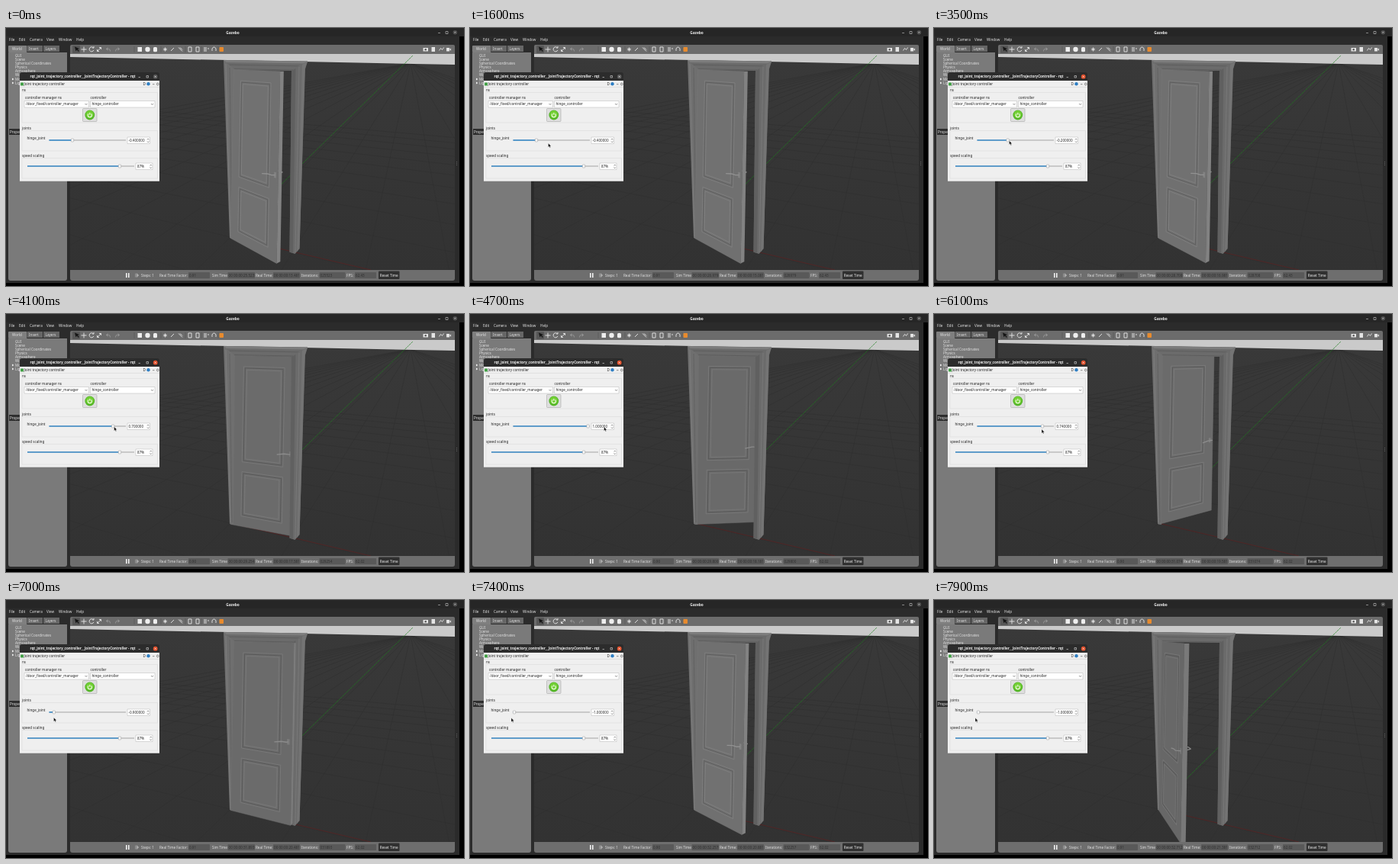
Recreate the animation shown at these times as an HTML page. Size 600 px wide and 338 px high, loop 8 s.

```html
<!DOCTYPE html>
<html lang="en">
<head>
<meta charset="utf-8">
<title>Door joint control</title>
<style>
html, body { margin: 0; width: 100%; height: 100%; overflow: hidden; background: #000; }
svg { display: block; width: 100vw; height: 100vh; }
text { font: 4.6px "Noto Sans", sans-serif; white-space: pre; }
.bold { font-weight: 700; }
.light { fill: #e2e2e2; }
.dim { fill: #303030; }
.qt { fill: #242424; }
.box { fill: #fff; stroke: #b4b4b4; stroke-width: .5; }
.group { fill: none; stroke: #d6d6d6; stroke-width: .5; }
</style>
</head>
<body>
<svg viewBox="0 0 600 338" xmlns="http://www.w3.org/2000/svg">
  <defs>
    <clipPath id="view"><rect x="84" y="34" width="504" height="283"/></clipPath>
    <linearGradient id="floor" x2="0" y2="1"><stop stop-color="#393939"/><stop offset="1" stop-color="#323232"/></linearGradient>
  </defs>

  <rect width="594" height="334" fill="#2b2b2b"/>
  <rect width="600" height="11" fill="#262626"/>
  <text x="297" y="7.800" text-anchor="middle" class="bold" fill="#eee" style="font-size:4.8px">Gazebo</text>
  <circle cx="588.300" cy="5.700" r="2.800" fill="#4c4c4c"/>
  <path d="M566 6.500h3M576 4.500h3v3h-3zM587.300 4.700l2 2m0-2l-2 2" fill="none" stroke="#ccc" stroke-width=".6"/>
  <g id="menu" class="light"></g>

  <path d="M3 32h77v296q0 3-3 3H6q-3 0-3-3z" fill="#7a7a7a"/>
  <rect x="3" y="23" width="24.500" height="9" rx="1" fill="#7f7f7f"/>
  <path d="M28 23h20v8H28zM49 23h21v8H49z" fill="#666"/>
  <rect x="4" y="132" width="75" height="8" fill="#2e2e2e"/>
  <g id="tree" class="light"></g>
  <path d="M8 65.500l2.500 1.500-2.500 1.500zM8 70.500l2.500 1.500-2.500 1.500z" fill="#eee"/>
  <path d="M82 175v5M590.500 175v5" stroke="#777" stroke-width=".7" stroke-dasharray="1 1"/>

  <rect x="84" y="22" width="504" height="14" rx="2" fill="#6c6c6c"/>
  <rect x="87" y="23" width="10" height="10" rx="1" fill="#575757"/>
  <path d="M90 24.500l1.500 6 1.400-2 1.900 2.400 1-.9-1.900-2.300 2.200-.6z" fill="#151515"/>
  <g fill="none" stroke="#e8e8e8" stroke-width=".9">
    <path d="M98.500 28h7M102 24.500v7M114.500 26a3 3 0 1 0 .4 3M113 26h2v-2M119.500 30.500l5-5M122 25.500h2.500V28M119.500 28v2.500h2.500"/>
    <path d="M131.500 27.500l2-2m-2 2l2 2m-2-2h3q2 0 2 3M148.500 27.500l-2-2m2 2l-2 2m2-2h-3q-2 0-2 3" stroke="#999"/>
    <path d="M206 28h5M208.500 25.500v5M207 26.500l3 3m0-3l-3 3M216 30l4-4M226 25.500l5 5m-3-5l3 3M239 25h4v6h-4zM249 25h4v6h-4z" />
    <path d="M260 25v6m2-6v6m2-4h2M270 30v-3q2.500-4 5 0v3M567.500 29.500l2-3 2 2 2-3"/>
  </g>
  <path d="M168 24v8M203 24v8M235 24v8M256 24v8M278 24v8" stroke="#555" stroke-width=".6"/>
  <path d="M172.500 25h5.500v6h-5.500z" fill="#eee"/>
  <circle cx="185.500" cy="28" r="3.200" fill="#eee"/>
  <rect x="193" y="25" width="5" height="6.200" rx="1.500" fill="#eee"/>
  <rect x="279.500" y="25" width="5.500" height="6" rx="1" fill="#e88b2e"/>
  <path d="M546.500 26h6.500v4.500h-6.500zM557.500 25h4.500v6h-4.500zM577 26h4v4.500h-4zM581 28l2-1.500v3.500z" fill="#e4e4e4"/>
  <circle cx="549.700" cy="28.200" r="1.200" fill="#555"/>

  <g clip-path="url(#view)">
    <rect x="84" y="34" width="504" height="284" fill="url(#floor)"/>
    <path id="grid" fill="none" stroke="#2f2f2f" stroke-width=".6"/>
    <path d="M84 34h504v14L84 38z" fill="#cacaca"/>
    <path d="M294 274L478 317" stroke="#5e2020" stroke-width=".7"/>
    <path d="M294 270L533 36" stroke="#1d801d" stroke-width=".7" stroke-dasharray="3 .6"/>
    <g id="behind"></g>
    <g stroke-linejoin="round">
      <path d="M285 42L395 43.500 391 53 374 56 299 55z" fill="#6b6b6b"/>
      <path d="M285 42L395 43.500 394 46.500 286 45z" fill="#7d7d7d"/>
      <path d="M287 48L391 50M297 53.500L376 55" stroke="#585858" stroke-width=".7"/>
      <path d="M285 42L300 54.500 298 276 293 275z" fill="#6f6f6f"/>
      <path d="M288 47L294 273" stroke="#808080" stroke-width=".8"/>
      <path d="M293 52L296 273" stroke="#5c5c5c" stroke-width=".7"/>
      <path d="M374 56L384 49 395 44 392 54 384.500 289 378.500 296 371.500 293.500z" fill="#6b6b6b"/>
      <path d="M374 56L379.500 53 376 295 371.500 293.500z" fill="#606060"/>
      <path d="M388 48L394.500 44.500 391.500 54 384.500 289 381 293z" fill="#747474"/>
      <path d="M384 51L379 294" stroke="#7c7c7c" stroke-width=".8"/>
    </g>
    <g id="front"></g>
  </g>

  <path d="M84 317h504v11q0 3-3 3H87q-3 0-3-3z" fill="#6e6e6e"/>
  <path d="M157.800 321v6M160.800 321v6" stroke="#fff" stroke-width="1.400"/>
  <path d="M169.500 321.500v5M171 321.500l3 2.500-3 2.500z" stroke="#aaa" fill="#aaa" stroke-width=".6"/>
  <g id="status"></g>
  <rect x="488" y="318.500" width="27.500" height="10.500" rx="1" fill="#303030"/>
  <text x="501.700" y="325.700" text-anchor="middle" fill="#eee">Reset Time</text>

  <path d="M18 70V61q0-3 3-3h177q3 0 3 3v9z" fill="#2c2c2c"/>
  <rect x="18" y="69" width="183" height="131.700" fill="#efefef"/>
  <text x="100.500" y="65.400" text-anchor="middle" class="bold" fill="#f4f4f4" style="font-size:4.5px">rqt_joint_trajectory_controller__JointTrajectoryController - rqt</text>
  <path d="M173.500 64.500h2.500M184 62.500h2.500v2.500H184z" fill="none" stroke="#ddd" stroke-width=".6"/>
  <circle id="close" cx="195.700" cy="63.700" r="2.900"/>
  <path d="M194.700 62.700l2 2m0-2l-2 2" stroke="#fff" stroke-width=".6"/>
  <path d="M18 77.500h183" stroke="#d0d0d0" stroke-width=".5"/>
  <rect x="19" y="71.500" width="4" height="4" rx=".5" fill="#43a047"/>
  <circle cx="186.500" cy="73.300" r="2.200" fill="#2f7fc4"/>
  <circle cx="198.800" cy="73.500" r="1.400" fill="none" stroke="#444" stroke-width=".6"/>
  <path d="M192 73.700h2.500" stroke="#444" stroke-width=".6"/>
  <path class="group" d="M21 84.500h177.500v39.500H21zM21 134.500h177.500V161H21zM21 170.500h177.500V197H21z"/>
  <path class="box" d="M24 95.500h84.500v8.500H24zM110.500 95.500H195v8.500h-84.500zM159 143h29.500v8.500H159zM170 177h22v8.500h-22z"/>
  <path d="M103.500 99l1.500 1.500 1.500-1.500M190 99l1.500 1.500 1.500-1.500M185 146.300l1.200-1.300 1.200 1.300M185 148.500l1.200 1.300 1.200-1.300M188.500 180.300l1.200-1.300 1.200 1.300M188.500 182.500l1.200 1.300 1.200-1.300" fill="none" stroke="#444" stroke-width=".6"/>
  <rect x="100.500" y="105.500" width="18.500" height="17" rx="1" fill="#dedede" stroke="#aaa" stroke-width=".6"/>
  <circle cx="109.800" cy="114" r="6.400" fill="#55b52a"/>
  <circle cx="109.800" cy="113.300" r="5" fill="#74d035"/>
  <path d="M108 112.300a2.600 2.600 0 1 0 3.600 0M109.800 111v2.800" fill="none" stroke="#f2fbea" stroke-width="1.100"/>
  <g id="labels" class="qt"></g>
  <g id="sliders"></g>
  <text id="value" class="qt" x="160.500" y="148.900"></text>
  <path id="cursor" d="M0 0v5.200l1.300-1.100.8 1.900.9-.4-.8-1.800h1.600z" fill="#080808" stroke="#fff" stroke-width=".35"/>
</svg>
<script>
const $ = id => document.getElementById(id);
const text = (x, y, s, cls = "") => `<text x="${x}" y="${y}" class="${cls}">${s}</text>`;
const path = (pts, fill, stroke = "none", w = .7, close = "z") =>
  `<path d="M${pts.map(p => p.map(n => n.toFixed(2))).join("L")}${close}" fill="${fill}" stroke="${stroke}" stroke-width="${w}" stroke-linejoin="round"/>`;
const gray = n => `rgb(${n},${n},${n})`;

// Linear interpolation through [position, value] keys
function along(keys, t) {
  const i = keys.findIndex(k => k[0] > t);
  if (i === 0) return keys[0][1];
  if (i < 0) return keys[keys.length - 1][1];
  const [a, p] = keys[i - 1], [b, q] = keys[i];
  return p + (q - p) * (t - a) / (b - a);
}

const cursorX = [[700, 4], [1100, 52], [1600, 102.500], [2100, 88], [3100, 88], [3500, 98.500], [4300, 156],
  [4700, 175.500], [5500, 175], [5700, 170], [6100, 141], [6600, 93], [7000, 62.500], [7400, 54]];
const cursorY = [[700, 322], [1100, 230], [1600, 151], [2100, 148.500], [3100, 147.500], [4700, 148],
  [5500, 149], [6100, 151], [7000, 154], [7400, 154.500]];
const target = [[3100, -.4], [3500, -.2], [4300, 1], [5850, 1], [6100, .74], [6600, -.28], [7000, -.9], [7300, -1]];
const joint = [[3350, -.4], [3500, -.38], [3800, -.18], [4700, .53], [5250, .95], [5400, 1], [6100, 1],
  [6300, .84], [7000, -.05], [7900, -.78], [8000, -.86]];
const shade = [[-70, 102], [-47, 112], [-27, 106], [6, 105], [33, 107]];
const FOCUS = 2700;

const WIDTH = 85, THICK = 6, FOCAL = 510;

// u: across the leaf, v: down the leaf, n: out of its front face
function project(angle, u, v, n = 0) {
  const s = Math.sin(angle), c = Math.cos(angle);
  const z = 1 + (u * WIDTH * s - n * c) / FOCAL;
  const x = (-39.500 + u * WIDTH * c + n * s) / z;
  const y = 44 + (11 + 221 * v) / z;
  return [336 + x - .018 * (y - 165), y + .012 * x];
}

function door(q) {
  const angle = q - 24 * Math.PI / 180;
  const at = (u, v, n) => project(angle, u, v, n);
  const rect = (u, v, U, V, n) => [at(u, v, n), at(U, v, n), at(U, V, n), at(u, V, n)];
  const tone = Math.round(along(shade, angle * 180 / Math.PI));
  const lever = (n, m) => path([at(.94, .545, n), at(.94, .54, m), at(.86, .54, m), at(.75, .548, m)],
    "none", gray(tone + 34), 1.300, "");
  const panel = (v, V) => [0, .025, .055].map((d, i) =>
    path(rect(.17 + d, v + d * .35, .825 - d, V - d * .35), gray(tone + [-3, 3, 1][i]), gray(tone + [18, -18, 16][i]), .8)).join("");
  let out = lever(-THICK, -THICK - 6);
  if (angle < -.2) {
    out += path([at(1, 0), at(1, 0, -THICK), at(1, 1, -THICK), at(1, 1)], gray(tone + 18));
  }
  out += path(rect(0, 0, 1, 1), gray(tone), gray(tone + 8), .5);
  out += panel(.063, .622) + panel(.68, .94);
  out += path(rect(.92, .53, .96, .56), gray(tone + 18));
  return out + lever(0, 6);
}

function drawGrid() {
  const origin = [294, 274], far = [530, 46], side = [-704, 30];
  const toward = (p, k) => origin.map((o, i) => o + (p[i] - o) * k);
  let d = "";
  for (let i = -10; i <= 10; i++) {
    const a = toward(side, -.407 * i / (5.4 - .407 * i));
    const b = a.map((p, j) => p - (far[j] - p) * 3);
    d += `M${far}L${b}`;
    if (i > -5) {
      const g = toward(far, .913 * i / (5.4 + .913 * i));
      d += `M${side}L${g.map((p, j) => p + (p - side[j]) * 1.500)}`;
    }
  }
  $("grid").setAttribute("d", d);
}

function slider(x, end, y, pos) {
  return `<path d="M${x} ${y}H${end}" stroke="#bdbdbd" stroke-width="1.400"/>
    <path d="M${x} ${y}H${pos}" stroke="#3c8ecb" stroke-width="1.600"/>
    <rect x="${pos - 1.700}" y="${y - 2}" width="3.400" height="4" rx=".8" fill="#fafafa" stroke="#999" stroke-width=".5"/>`;
}

const pad = (n, size) => String(n).padStart(size, "0");
const clock = ms => `00 00:00:${pad(Math.floor(ms / 1000), 2)}.${pad(ms % 1000, 3)}`;

function status(t) {
  const sim = 25523 + Math.round(t * .91);
  const fields = [
    [201, "Real Time Factor:", 239, 28, t % 700 < 400 ? "0.91" : "0.90"],
    [270, "Sim Time:", 290.500, 35.500, clock(sim)],
    [327, "Real Time:", 350, 35, clock(13481 + t)],
    [387, "Iterations:", 410.500, 34, pad(sim, 6)],
    [446, "FPS:", 457, 28, t < 3800 ? "62.43" : "62.02"]
  ];
  return text(177, 325.700, "Steps: 1", "light") + fields.map(([x, label, fx, w, s]) =>
    text(x, 325.700, label, "light") +
    `<rect x="${fx}" y="320" width="${w}" height="8" rx=".8" fill="#595959"/>` +
    text(fx + 1, 325.700, s, "dim")).join("");
}

const list = rows => rows.map(r => text(...r)).join("");
$("menu").innerHTML = list([[4, 17.200, "File"], [17, 17.200, "Edit"], [31, 17.200, "Camera"],
  [53, 17.200, "View"], [69, 17.200, "Window"], [92, 17.200, "Help"]]);
$("tree").innerHTML = list([[8, 28.800, "World"], [30, 28.800, "Insert"], [51.500, 28.800, "Layers"],
  [12, 37.500, "GUI"], [12, 42.600, "Scene"], [12, 47.700, "Spherical Coordinates"], [12, 52.800, "Physics"],
  [12, 57.900, "Atmosphere"], [12, 63, "Wind"], [12, 68.500, "Models"], [12, 73.500, "Lights"], [5, 137.800, "Property"]]);
$("labels").innerHTML = list([[23.500, 75.100, "Joint trajectory controller"], [179.500, 75.100, "D"], [21, 83.200, "ns"],
  [25, 92.800, "controller manager ns"], [110.500, 92.800, "controller"],
  [26, 101.300, "/door_fixed/controller_manager"], [112.500, 101.300, "hinge_controller"],
  [21, 132.500, "joints"], [27.500, 146.200, "hinge_joint"], [21, 168.800, "speed scaling"], [172, 182.900, "87%"]]);
drawGrid();

function draw(t) {
  const q = along(joint, t);
  const v = Math.round(along(target, t) * 50) / 50;
  $("behind").innerHTML = q > 0 ? door(q) : "";
  $("front").innerHTML = q > 0 ? "" : door(q);
  $("sliders").innerHTML = slider(56.500, 157, 147, 106.300 + 48.300 * v) + slider(28, 168, 181, 149);
  $("value").textContent = v.toFixed(6);
  $("status").innerHTML = status(t);
  $("close").setAttribute("fill", t < FOCUS ? "#555" : "#e2502c");
  $("cursor").setAttribute("transform", `translate(${along(cursorX, t)} ${along(cursorY, t)})`);
  $("cursor").setAttribute("visibility", t < 700 ? "hidden" : "visible");
}

function tick() {
  draw(Math.floor(performance.now() % 8000 / 100) * 100);
  requestAnimationFrame(tick);
}
tick();
</script>
</body>
</html>
```
